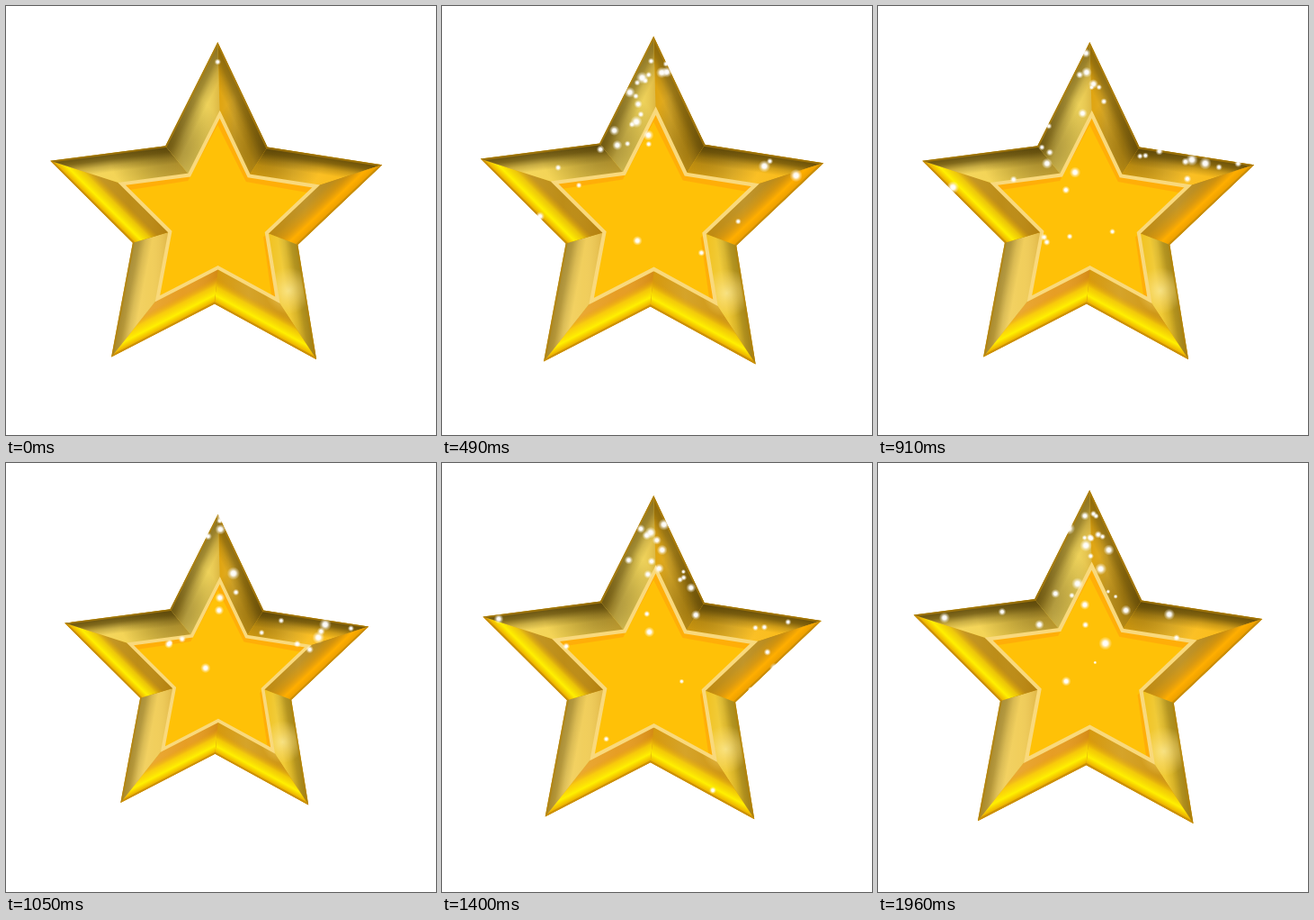
An HTML page with a canvas that plays this animation: 478 by 476 pixels, repeating every 2100 ms.

```html
<!DOCTYPE html>
<html>
<head>
<meta charset="utf-8">
<style>
html, body { margin: 0; width: 100%; height: 100%; overflow: hidden; background: #fff; }
canvas { display: block; }
</style>
</head>
<body>
<canvas id="stage" width="478" height="476"></canvas>
<script>
const ctx = document.getElementById('stage').getContext('2d');
const LOOP = 2100, STEP = 70, LAST = 28, CENTER = 239, TILT = .012;
const BIRTHS = 4.6; // new sparkles per step

const mix = (a, b, u) => a + (b - a) * u;
const rand = n => { const v = Math.sin(n * 127.1 + 11.7) * 43758.5453; return v - Math.floor(v); };

// Ten corners, clockwise from the top tip; odd ones are the notches
function star(cx, cy, tip, notch) {
  return Array.from({ length: 10 }, (_, i) => {
    const a = i * Math.PI / 5 + TILT, r = i % 2 ? notch : tip;
    return [cx + r * Math.sin(a), cy - r * Math.cos(a)];
  });
}

const outer = star(233, 234, 194, 96.5);
const inner = star(236.3, 233.7, 113.5, 56.5);
const face = star(234, 239, 107, 55);

// Facet tones, clockwise from the right side of the top tip
const tones = ['#d9a010', '#fab914', '#b28010', '#eec424', '#cc920e',
  '#e5981c', '#f0cc58', '#b8860e', '#f2d04c', '#f0d458'];

function path(points) {
  ctx.beginPath();
  for (const p of points) ctx.lineTo(...p);
  ctx.closePath();
}

function paint(gradient, colors) {
  colors.forEach((c, i) => gradient.addColorStop(i / (colors.length - 1), c));
  ctx.fillStyle = gradient;
  ctx.fill();
}

function glow(x, y, r, colors) {
  ctx.beginPath();
  ctx.arc(x, y, r, 0, 7);
  paint(ctx.createRadialGradient(x, y, 0, x, y, r), colors);
}

const shade = alpha => `rgba(84, 64, 6, ${alpha})`;

// Lower edges catch a yellow light, the others fall into shadow
function bevel(i, quad) {
  const [a, b] = quad, notch = i % 2 ? a : b;
  const dx = b[0] - a[0], dy = b[1] - a[1], len = Math.hypot(dx, dy);
  const lit = dx < 0 && i !== 6;
  const depth = (lit ? 26 : 21) / len;
  const dark = .4 + .5 * Math.abs(dx) / len;
  path(quad);
  paint(ctx.createLinearGradient(...a, a[0] - dy * depth, a[1] + dx * depth),
    lit ? ['#e89c00', i === 2 ? '#ffae00' : '#fff000', i === 2 ? '#f0a00070' : '#ffdc00b0', '#e8a00000']
        : [shade(dark), shade(dark * .8), shade(dark * .3), shade(0)]);
  if (i < 2 || i > 7) {
    paint(ctx.createRadialGradient(...notch, 0, ...notch, 65), [shade(.6), shade(.3), shade(0)]);
  }
}

function drawFacet(i, flat) {
  const j = (i + 1) % 10, quad = [outer[i], outer[j], inner[j], inner[i]];
  const xs = quad.map(p => p[0]);
  path(quad);
  ctx.fillStyle = tones[i];
  ctx.fill();
  paint(ctx.createLinearGradient(Math.min(...xs), 0, Math.max(...xs), 0),
    ['#ffb00030', '#fff0a030', '#fff0a010', '#a0600040']);
  if (!flat) bevel(i, quad);
}

function outline(points, width, color) {
  path(points);
  ctx.lineWidth = width;
  ctx.strokeStyle = color;
  ctx.stroke();
}

function fill(points, color) {
  path(points);
  ctx.fillStyle = color;
  ctx.fill();
}

function drawStar(size, flat) {
  ctx.save();
  ctx.translate(CENTER, CENTER);
  ctx.scale(size, size);
  ctx.translate(-CENTER, -CENTER);
  fill(outer, '#d59b0c');
  ctx.clip();
  tones.forEach((_, i) => drawFacet(i, flat));
  glow(314, 316, 26, ['#fff2b0a0', '#fbe08070', '#fbe08000']);
  outline(outer, flat ? 8 : 4, flat ? '#cb8d0a' : '#b98508a0');
  fill(inner, '#ffae08');
  ctx.save();
  ctx.clip();
  fill(face, '#ffc107');
  ctx.restore();
  outline(inner, 4, '#f9d97c');
  ctx.restore();
}

// Beat: shrink, swell, settle, rest
const beat = [[0, 1], [1, .916], [4, 1.092], [6, 1.02], [7, 1], [10, 1]];

function sizeAt(k) {
  // The loop ends before the last swell is complete
  const q = k < 4 ? 0 : (Math.min(k, 27.3) - 4) % 10;
  const n = beat.findIndex(b => b[0] > q);
  const [q0, s0] = beat[n - 1], [q1, s1] = beat[n];
  return mix(s0, s1, (q - q0) / (q1 - q0));
}

// Sparkles start on the upper outline and fall; the first one sits at the top
const ridge = [outer[8], outer[9], outer[0], outer[1], outer[2]];

function drawSparkle(i, k) {
  const r = n => rand(i * 7 + n);
  const age = k - i / BIRTHS, life = 5 + 4 * r(6);
  if (age < 0 || age > life) return;
  const u = i ? (r(1) < .25 ? 1.6 + .8 * r(2) : 4 * r(2)) : 2;
  const s = Math.floor(u), a = ridge[s], b = ridge[s + 1];
  const x = mix(a[0], b[0], u - s) + (r(3) - .5) * 10 * age;
  const y = mix(a[1], b[1], u - s) + (i ? 3 : 22) + 36 * r(4) ** 2 * age;
  const size = (3.5 + 4 * r(5) ** 2) * Math.min(1, (life - age) / 2 + .4);
  glow(x, y, size, ['#fff', '#fffffff0', '#ffffff60', '#ffffff00']);
}

function draw(now) {
  const k = Math.min(LAST, Math.floor(now % LOOP / STEP));
  ctx.fillStyle = '#fff';
  ctx.fillRect(0, 0, 478, 476);
  drawStar(sizeAt(k), k % 10 === 4);
  for (let i = 0; i <= LAST * BIRTHS; i++) drawSparkle(i, k);
}

let start;
function tick(now) {
  start ??= now;
  draw(now - start);
  requestAnimationFrame(tick);
}
requestAnimationFrame(tick);
</script>
</body>
</html>
```
